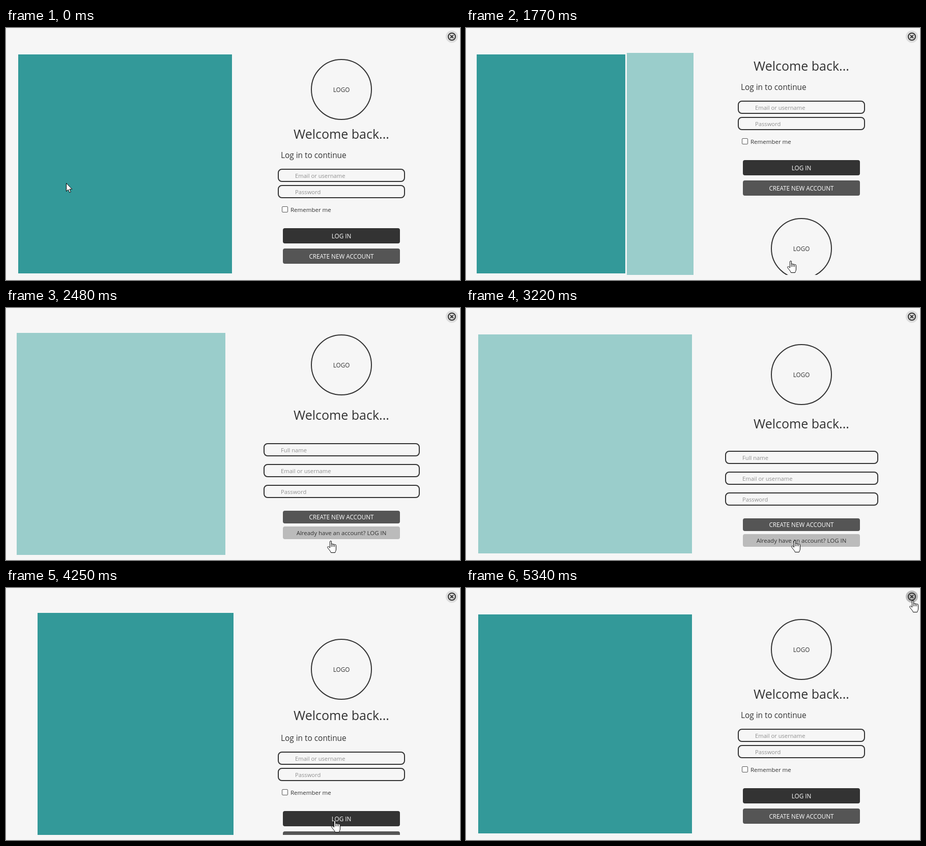
An HTML page that plays this animation: 892x496 px, repeating every 6.67 s.

```html
<!DOCTYPE html>
<html lang="en">
<head>
<meta charset="utf-8">
<title>Login and sign-up slide</title>
<style>
  html, body { margin: 0; width: 100%; height: 100%; overflow: hidden; background: #f6f6f6; }
  svg { display: block; width: 892px; height: 496px; }
  text { font-family: "Open Sans", "Noto Sans", sans-serif; font-size: 11.7px; fill: #333; }
  .title { font-size: 25px; }
  .subtitle { font-size: 15.4px; }
  .hint { font-size: 11.2px; fill: #909090; }
  .small { font-size: 11.5px; }
  .center { text-anchor: middle; }
  .light { fill: #fff; }
  .line { fill: none; stroke: #333; stroke-width: 2; }
  .cursor { fill: #fff; stroke: #000; stroke-linejoin: round; }
</style>
</head>
<body>
<svg viewBox="0 0 892 496">
  <clipPath id="leftView"><rect x="21" y="49" width="426" height="437"/></clipPath>
  <clipPath id="rightView"><rect x="450" y="49" width="442" height="437"/></clipPath>
  <g clip-path="url(#leftView)">
    <rect id="loginPanel" fill="#339999"/>
    <rect id="signupPanel" fill="#9acdcb"/>
  </g>
  <g id="forms" clip-path="url(#rightView)"></g>
  <circle id="close" cx="876" cy="17" r="12"/>
  <circle class="line" cx="876" cy="17" r="7"/>
  <path class="line" d="M873 14l6 6m0-6l-6 6"/>
  <path id="arrow" class="cursor" d="M.5.5V16.5L4.2 13 6.7 18.8 9.3 17.7 6.8 12.2H11.8Z"/>
  <g id="hand" class="cursor">
    <path d="M5.5 14V2a1.5 1.5 0 0 1 3 0V7.5a1.5 1.5 0 0 1 3 .5a1.5 1.5 0 0 1 3 .7a1.4 1.4 0 0 1 3 1V17c0 3-1.5 4-2 6.5H7.5C7 20.5 3 17.5.8 13.5C0 11.5 2.5 10.8 3.8 12.3Z"/>
    <path d="M8.5 7.5V12M11.5 8V12M14.5 9V12"/>
  </g>
</svg>
<script>
const LOOP = 6670, PAGE_W = 426, PAGE_H = 437;
const byId = id => document.getElementById(id);

// Form parts
const label = (x, y, text, cls) => `<text x="${x}" y="${y}" class="${cls}">${text}</text>`;
const logo = y => `<circle class="line" cx="659" cy="${y}" r="59"/>` + label(659, y + 5, 'LOGO', 'center');
const title = y => label(659, y, 'Welcome back...', 'title center');
const button = (y, h, color, text, cls) =>
  `<rect x="544" y="${y}" width="230" height="${h}" rx="4" fill="${color}"/>` +
  label(659, y + h / 2 + 4.7, text, 'center ' + cls);
const field = (x, y, w, hint) =>
  `<g class="field"><rect class="line" x="${x + 1}" y="${y + 1}" width="${w - 2}" height="24" rx="7"/>` +
  label(x + 34, y + 18, hint, 'hint') + '</g>';
const form = (id, ...parts) =>
  `<g id="${id}">${parts.map(part => `<g>${part}</g>`).join('')}</g>`;

byId('forms').innerHTML =
  form('login', logo(121), title(218),
    label(540, 256, 'Log in to continue', 'subtitle') +
    field(534, 277, 250, 'Email or username') +
    field(534, 309, 250, 'Password') +
    '<rect x="542.5" y="351.5" width="11" height="11" rx="1.5" fill="#fff" stroke="#555"/>' +
    label(559, 362, 'Remember me', 'small') +
    button(394, 30, '#333', 'LOG IN', 'light') +
    button(434, 30, '#555', 'CREATE NEW ACCOUNT', 'light')) +
  form('signup', logo(131), title(237),
    field(509, 281, 301, 'Full name') +
    field(509, 322, 301, 'Email or username') +
    field(509, 363, 301, 'Password') +
    button(414, 25, '#555', 'CREATE NEW ACCOUNT', 'light') +
    button(445, 25, '#bbb', 'Already have an account? LOG IN', 'small'));

// The screen refreshes in bursts: [first, last, steps]
const bursts = [[0, 0, 1], [170, 320, 3], [570, 1200, 9], [1270, 1270, 1], [1770, 2630, 12],
  [2970, 3220, 4], [3790, 4390, 9], [4480, 5020, 8]];

function sampleTime(t) {
  const [first, last, steps] = bursts.findLast(burst => burst[0] <= t);
  if (steps === 1) return first;
  const step = (last - first) / (steps - 1);
  return Math.min(last, first + Math.floor((t - first + 0.5) / step) * step);
}

// Pointer tip: [time, x, y]
const pointerKeys = [[0, 118, 305], [95, 118, 305], [320, 492, 422], [491, 492, 422],
  [800, 548, 477], [1050, 605, 476], [1200, 637, 458], [1270, 638, 458], [2890, 638, 458],
  [3220, 646, 457], [4240, 646, 457], [4390, 824, 185], [4557, 860, 71], [4950, 878, 24],
  [LOOP, 878, 24]];

function pointerAt(t) {
  const i = pointerKeys.findIndex(key => key[0] > t);
  const [t0, x0, y0] = pointerKeys[i - 1], [t1, x1, y1] = pointerKeys[i];
  const k = (t - t0) / (t1 - t0);
  return [Math.round(x0 + (x1 - x0) * k), Math.round(y0 + (y1 - y0) * k)];
}

const outBack = u => 1 + 2.70158 * (u - 1) ** 3 + 1.70158 * (u - 1) ** 2;

// position: 0 shows the login page, 1 the sign-up page
function slideAt(t) {
  const open = (t - 1702.6) / 936, back = (t - 3725.3) / 967;
  if (open <= 0 || back >= 0.98) return { position: 0 };
  if (open < 0.98) return { position: outBack(open), incoming: 'signup' };
  if (back <= 0) return { position: 1 };
  return { position: 1 - outBack(back), incoming: 'login' };
}

const move = (el, x, y) => el.setAttribute('transform', `translate(${x} ${y})`);

function setAttributes(el, values) {
  for (const name in values) el.setAttribute(name, values[name]);
}

// An incoming page has no margin until it has settled.
function placePage(name, x, y, margin, spread) {
  setAttributes(byId(name + 'Panel'), {
    x: 21 + margin + x, y: 49 + margin,
    width: PAGE_W - 2 * margin, height: PAGE_H - 2 * margin
  });
  const page = byId(name);
  move(page, 0, y);
  [-spread, 0, spread].forEach((shift, i) => move(page.children[i], 0, shift));
}

function widenSignupFields(extra) {
  for (const el of byId('signup').querySelectorAll('.field')) {
    setAttributes(el.firstChild, { x: 510 - extra, width: 299 + 2 * extra });
    el.lastChild.setAttribute('x', 543 - extra);
  }
}

function draw(t) {
  const { position, incoming } = slideAt(t);
  const dx = Math.round(PAGE_W * position), dy = Math.round(PAGE_H * position);
  const loginIn = incoming === 'login', signupIn = incoming === 'signup';
  placePage('login', -dx, -dy, loginIn ? 0 : 3, loginIn ? 3 : 0);
  placePage('signup', PAGE_W - dx, PAGE_H - dy, signupIn ? 0 : 3, signupIn && position > 0.5 ? 2 : 0);
  widenSignupFields(signupIn ? 3 : 0);

  const [x, y] = pointerAt(t), isHand = t > 1130;
  byId('arrow').style.display = isHand ? 'none' : '';
  byId('hand').style.display = isHand ? '' : 'none';
  move(byId('arrow'), x, y);
  move(byId('hand'), x - 7, y);
  byId('close').setAttribute('fill', Math.hypot(x - 876, y - 17) < 12 ? '#bbb' : '#ddd');
}

const startTime = performance.now();
function tick() {
  draw(sampleTime((performance.now() - startTime) % LOOP));
  requestAnimationFrame(tick);
}
tick();
</script>
</body>
</html>
```
